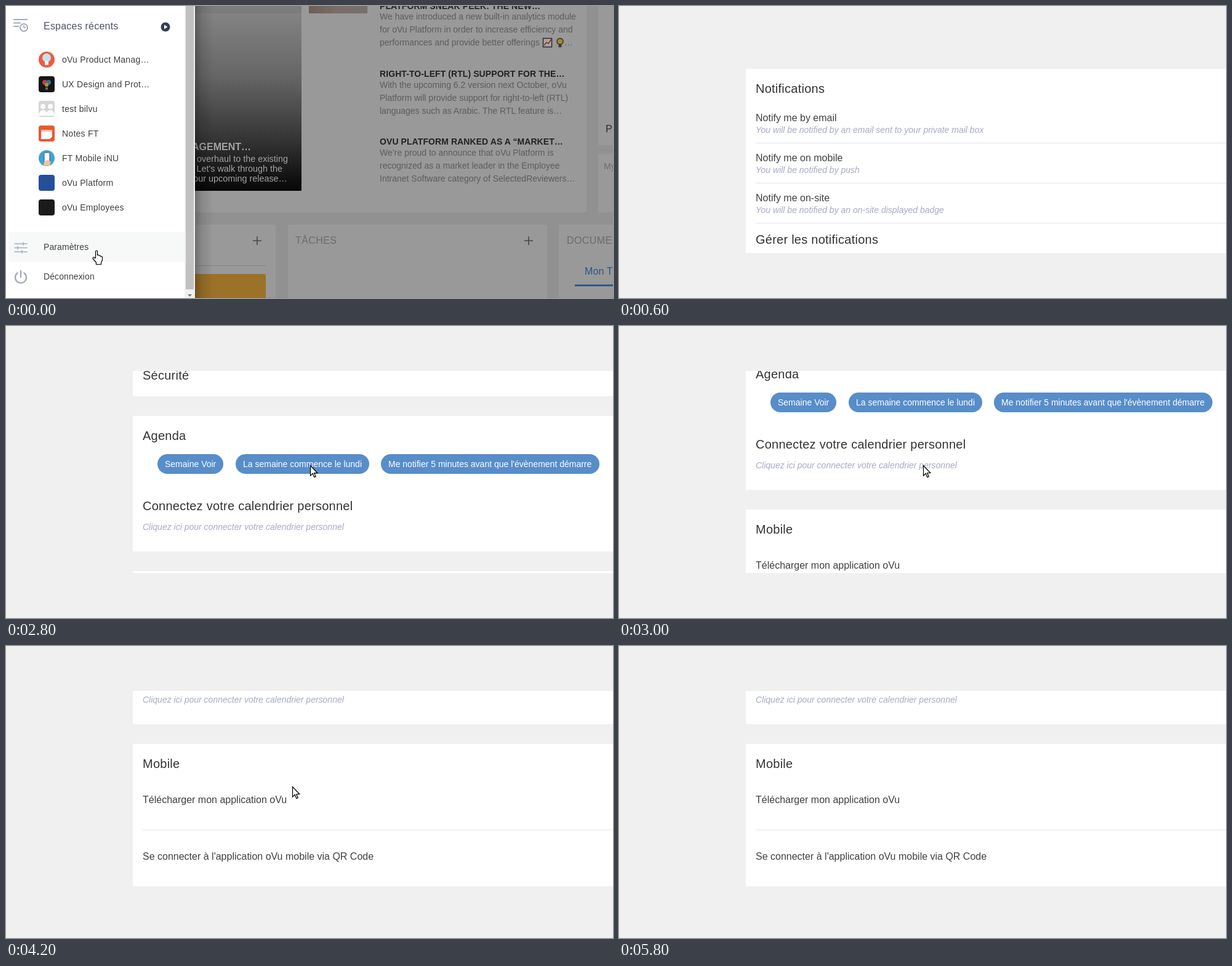
An HTML page that plays this animation: 986 by 474 pixels, repeating every 6800 ms.

```html
<!DOCTYPE html>
<html lang="fr">
<head>
<meta charset="utf-8">
<title>Paramètres</title>
<style>
  html, body { margin: 0; width: 100%; height: 100%; overflow: hidden; background: #f0f0f0; }
  svg { display: block; width: 986px; height: 474px; }
  text { font: 14px "Liberation Sans", Arial, sans-serif; fill: #404040; white-space: pre; }
  .title { font-size: 20px; letter-spacing: .25px; fill: #333; }
  .row { font-size: 16px; }
  .hint { font-style: italic; fill: #a5abc2; }
  .pill rect { fill: #578dc9; }
  .pill text { fill: #fff; }
  .card { fill: #fff; }
  .line { stroke: #e4e5ea; }
  .menu text { letter-spacing: .25px; }
  .menu .head { font-size: 16px; fill: #4d5466; letter-spacing: .22px; }
  .menu .action { letter-spacing: .1px; }
  .icon { fill: none; stroke: #a3abbd; stroke-width: 1.5; stroke-linecap: round; }
  .dim { fill: #999; }
  .news text { fill: #5c5c5c; }
  .news .lead { font-weight: bold; fill: #222; letter-spacing: .08px; }
  .hero text { font-size: 14.4px; fill: #a3a3a3; text-anchor: end; }
  .hero .lead { font-size: 16px; font-weight: bold; }
  .app text { font-size: 16px; fill: #686b71; letter-spacing: .4px; }
  .plus { stroke: #44474d; stroke-width: 1.6; }

  .home, .scroll, .pointer { animation: 6800ms step-end infinite; }
  .home { animation-name: leave; }
  .scroll { animation-name: scroll; }
  .pointer { animation-name: point; }

  @keyframes leave {
    0% { opacity: 1; }
    2.94% { opacity: .65; }
    5.88% { opacity: .25; }
    8.82%, 100% { opacity: 0; }
  }
  @keyframes scroll {
    0% { transform: translateY(0); }
    38.23% { transform: translateY(-200px); }
    41.17% { transform: translateY(-400px); }
    44.11% { transform: translateY(-500px); }
    47.05% { transform: translateY(-600px); }
    52.94%, 100% { transform: translateY(-639px); }
  }
  @keyframes point {
    0% { opacity: 0; transform: translate(262px, 128px); }
    17.64% { opacity: 1; transform: translate(262px, 128px); }
    20.58% { opacity: 1; transform: translate(340px, 164px); }
    23.52% { opacity: 1; transform: translate(425px, 204px); }
    26.47% { opacity: 1; transform: translate(486px, 232px); }
    29.41% { opacity: 1; transform: translate(508px, 240px); }
    32.35% { opacity: 1; transform: translate(494px, 226px); }
    52.94% { opacity: 1; transform: translate(476px, 229px); }
    55.88% { opacity: 1; transform: translate(465px, 228px); }
    64.7% { opacity: 1; transform: translate(446px, 246px); }
    67.64% { opacity: 1; transform: translate(436px, 262px); }
    70.58% { opacity: 1; transform: translate(452px, 302px); }
    73.52% { opacity: 1; transform: translate(480px, 338px); }
    76.47% { opacity: 1; transform: translate(496px, 347px); }
    79.41% { opacity: 1; transform: translate(490px, 347px); }
    82.35% { opacity: 1; transform: translate(480px, 346px); }
    85.29%, 100% { opacity: 0; transform: translate(480px, 346px); }
  }
</style>
</head>
<body>
<svg viewBox="0 0 986 474">
  <defs>
    <clipPath id="view"><rect x="206" y="73" width="780" height="328"/></clipPath>
    <linearGradient id="shade" x2="0" y2="1">
      <stop offset="0" stop-color="#838383"/>
      <stop offset=".35" stop-color="#666"/>
      <stop offset=".7" stop-color="#363636"/>
      <stop offset="1" stop-color="#060606"/>
    </linearGradient>
    <linearGradient id="edge">
      <stop offset="0" stop-opacity=".28"/>
      <stop offset=".35" stop-opacity=".12"/>
      <stop offset="1" stop-opacity="0"/>
    </linearGradient>
    <linearGradient id="photo">
      <stop offset="0" stop-color="#6d5f55"/>
      <stop offset=".5" stop-color="#7a6e66"/>
      <stop offset="1" stop-color="#75706c"/>
    </linearGradient>
    <path id="plus" class="plus" d="M-7 0H7M0-7V7"/>
  </defs>

  <rect width="986" height="474" fill="#f0f0f0"/>

  <!-- settings page -->
  <g clip-path="url(#view)">
    <g class="scroll">
      <rect class="card" x="206" y="102" width="780" height="314"/>
      <text class="title" x="222" y="141">Notifications</text>
      <text class="row" x="222" y="187">Notify me by email</text>
      <text class="hint" x="222" y="206">You will be notified by an email sent to your private mail box</text>
      <text class="row" x="222" y="252">Notify me on mobile</text>
      <text class="hint" x="222" y="271">You will be notified by push</text>
      <text class="row" x="222" y="317">Notify me on-site</text>
      <text class="hint" x="222" y="336">You will be notified by an on-site displayed badge</text>
      <path class="line" d="M222 222.5H986M222 287.5H986M222 352.5H986"/>
      <text class="title" x="222" y="386">Gérer les notifications</text>

      <rect class="card" x="206" y="448" width="780" height="66"/>
      <text class="title" x="222" y="487">Sécurité</text>

      <rect class="card" x="206" y="546" width="780" height="220"/>
      <text class="title" x="222" y="585">Agenda</text>
      <g class="pill">
        <rect x="246" y="608" width="107" height="32" rx="16"/>
        <rect x="373" y="608" width="217" height="32" rx="16"/>
        <rect x="609" y="608" width="355" height="32" rx="16"/>
        <text x="258" y="629">Semaine Voir</text>
        <text x="385" y="629">La semaine commence le lundi</text>
        <text x="621" y="629">Me notifier 5 minutes avant que l'évènement démarre</text>
      </g>
      <text class="title" x="222" y="699">Connectez votre calendrier personnel</text>
      <text class="hint" x="222" y="731">Cliquez ici pour connecter votre calendrier personnel</text>

      <rect class="card" x="206" y="798" width="780" height="231"/>
      <text class="title" x="222" y="837">Mobile</text>
      <text class="row" x="222" y="894">Télécharger mon application oVu</text>
      <path class="line" d="M222 937.5H986"/>
      <text class="row" x="222" y="986">Se connecter à l'application oVu mobile via QR Code</text>
    </g>
  </g>

  <g class="pointer">
    <path d="M.5 .5V17L4.2 13.4 6.8 19.4 9.2 18.4 6.7 12.5H11.8Z" fill="#fff" stroke="#000" stroke-width="1.2"/>
  </g>

  <!-- home page behind the open menu -->
  <g class="home">
    <rect width="986" height="474" fill="#919191"/>
    <g class="dim">
      <rect x="290" y="0" width="653" height="335"/>
      <rect x="962" y="0" width="24" height="226"/>
      <rect x="962" y="240" width="24" height="95"/>
      <rect x="290" y="355" width="148" height="119" rx="3"/>
      <rect x="458" y="355" width="421" height="119" rx="3"/>
      <rect x="898" y="355" width="88" height="119" rx="3"/>
    </g>

    <rect x="306" width="174" height="12" fill="#7c7c7c"/>
    <rect x="306" y="12" width="174" height="288" fill="url(#shade)"/>
    <g class="hero">
      <text class="lead" x="398" y="234">MANAGEMENT…</text>
      <text x="458" y="253">overhaul to the existing</text>
      <text x="449" y="269">Let's walk through the</text>
      <text x="457" y="285">our upcoming release…</text>
    </g>
    <rect x="492" width="95" height="12" fill="url(#photo)"/>

    <g class="news">
      <text class="lead" x="607" y="5">PLATFORM SNEAK PEEK: THE NEW…</text>
      <text x="607" y="22">We have introduced a new built-in analytics module</text>
      <text x="607" y="43">for oVu Platform in order to increase efficiency and</text>
      <text x="607" y="64">performances and provide better offerings</text>
      <text x="907" y="64">…</text>
      <text class="lead" x="607" y="115">RIGHT-TO-LEFT (RTL) SUPPORT FOR THE…</text>
      <text x="607" y="133">With the upcoming 6.2 version next October, oVu</text>
      <text x="607" y="154">Platform will provide support for right-to-left (RTL)</text>
      <text x="607" y="175">languages such as Arabic. The RTL feature is…</text>
      <text class="lead" x="607" y="225">OVU PLATFORM RANKED AS A “MARKET…</text>
      <text x="607" y="243">We’re proud to announce that oVu Platform is</text>
      <text x="607" y="264">recognized as a market leader in the Employee</text>
      <text x="607" y="285">Intranet Software category of SelectedReviewers…</text>
    </g>
    <rect x="872.5" y="52.5" width="14" height="14" fill="#a9a6a0" stroke="#2c2c2c" stroke-width="1.5"/>
    <path d="M874 64L878 59 881 61 886 54" fill="none" stroke="#8c2a2a" stroke-width="1.6"/>
    <circle cx="900" cy="57.5" r="5" fill="#a8862a" stroke="#2e2918" stroke-width="1.3"/>
    <path d="M897.5 63H902.5V67H897.5Z" fill="#3c3c3c"/>

    <g class="app">
      <text x="974" y="205" style="fill:#2c2c2c">P</text>
      <text x="971" y="265" style="font-size:14px;letter-spacing:0">My</text>
      <text x="470" y="386">TÂCHES</text>
      <text x="911" y="386">DOCUMENTS</text>
      <text x="940" y="436" style="fill:#2b5486;letter-spacing:.1px">Mon Travail</text>
    </g>
    <rect x="924" y="452" width="62" height="3" fill="#305a8c"/>
    <use href="#plus" x="408" y="381"/>
    <use href="#plus" x="849" y="381"/>
    <path d="M307 421.5H422" stroke="#848484"/>
    <rect x="290" y="435" width="132" height="50" rx="3" fill="#9c7228"/>

    <!-- side menu -->
    <rect x="307" width="30" height="474" fill="url(#edge)"/>
    <rect width="290" height="474" fill="#fff"/>
    <rect x="290" width="17" height="474" fill="#f1f1f1"/>
    <rect x="292" width="13" height="460" fill="#c1c1c1"/>
    <path d="M295 468H302L298.5 472Z" fill="#777"/>
    <rect x="4" y="367" width="286" height="48" fill="#f7f8f8"/>

    <g class="icon">
      <path d="M13 22H34M13 27.5H23M13 33H20" stroke-width="2.2"/>
      <circle cx="29" cy="35" r="6" stroke-width="2"/>
      <path d="M29 31.5V35H32"/>
      <path d="M14 386H34M14 392.5H34M14 399H34M28 384V388M19 390.5V394.5M26 397V401"/>
      <path d="M18.5 433.5A9 9 0 1 0 29.5 433.5M24 430V440" stroke-width="2.4"/>
    </g>
    <circle cx="259" cy="34" r="7.5" fill="#343d54"/>
    <path d="M257 30.5L262.5 34 257 37.5Z" fill="#fff"/>

    <circle cx="66" cy="87" r="13" fill="#ee5a43"/>
    <circle cx="66" cy="84" r="7" fill="#bfe3ee"/>
    <rect x="63" y="89" width="6" height="7" rx="1" fill="#e9f3f5"/>

    <rect x="53" y="114" width="26" height="26" rx="4" fill="#161616"/>
    <circle cx="63" cy="124" r="4" fill="#b8453c"/>
    <circle cx="69" cy="124" r="4" fill="#3b6f9c"/>
    <circle cx="66" cy="128" r="3" fill="#b8923a"/>
    <rect x="64" y="132" width="4" height="4" fill="#666"/>

    <rect x="53" y="154" width="26" height="26" rx="4" fill="#d4d6d8"/>
    <g fill="#fff">
      <circle cx="60" cy="163" r="4"/>
      <circle cx="72" cy="163" r="4"/>
      <path d="M53 178Q54 169 60 169Q65 169 66 174Q67 169 72 169Q78 169 79 178Z"/>
    </g>

    <rect x="53" y="194" width="26" height="26" rx="4" fill="#e8582f"/>
    <path d="M57 201H75V212L71 216H57Z" fill="#fff"/>
    <path d="M57 201H75V204H57Z" fill="#f6c2a8"/>

    <circle cx="66" cy="247" r="13" fill="#3fa3d3"/>
    <rect x="62" y="238" width="9" height="16" rx="1.5" fill="#fff" stroke="#2b5672"/>
    <path d="M61 260L62 252 68 250 73 253 71 259Z" fill="#f0c19b"/>

    <rect x="53" y="274" width="26" height="26" rx="4" fill="#24509b"/>
    <rect x="53" y="314" width="26" height="26" rx="4" fill="#1b1b1b"/>

    <g class="menu">
      <text class="head" x="61" y="38">Espaces récents</text>
      <text x="91" y="92">oVu Product Manag…</text>
      <text x="91" y="132">UX Design and Prot…</text>
      <text x="91" y="172">test bilvu</text>
      <text x="91" y="212">Notes FT</text>
      <text x="91" y="252">FT Mobile iNU</text>
      <text x="91" y="292">oVu Platform</text>
      <text x="91" y="332">oVu Employees</text>
      <text class="action" x="61" y="396">Paramètres</text>
      <text class="action" x="61" y="444">Déconnexion</text>
    </g>

    <path transform="translate(140 396.5)" d="M5.5 12V2Q5.5 .5 7 .5T8.5 2V8Q11 7 11.5 9Q13.5 8.5 14 10Q16 9.5 16.5 11.5V16L14.5 20V23H6.5V20L1.5 14Q.5 12 2 11.5T4.5 13Z" fill="#fff" stroke="#000" stroke-width="1.2" stroke-linejoin="round"/>
  </g>
</svg>
</body>
</html>
```
